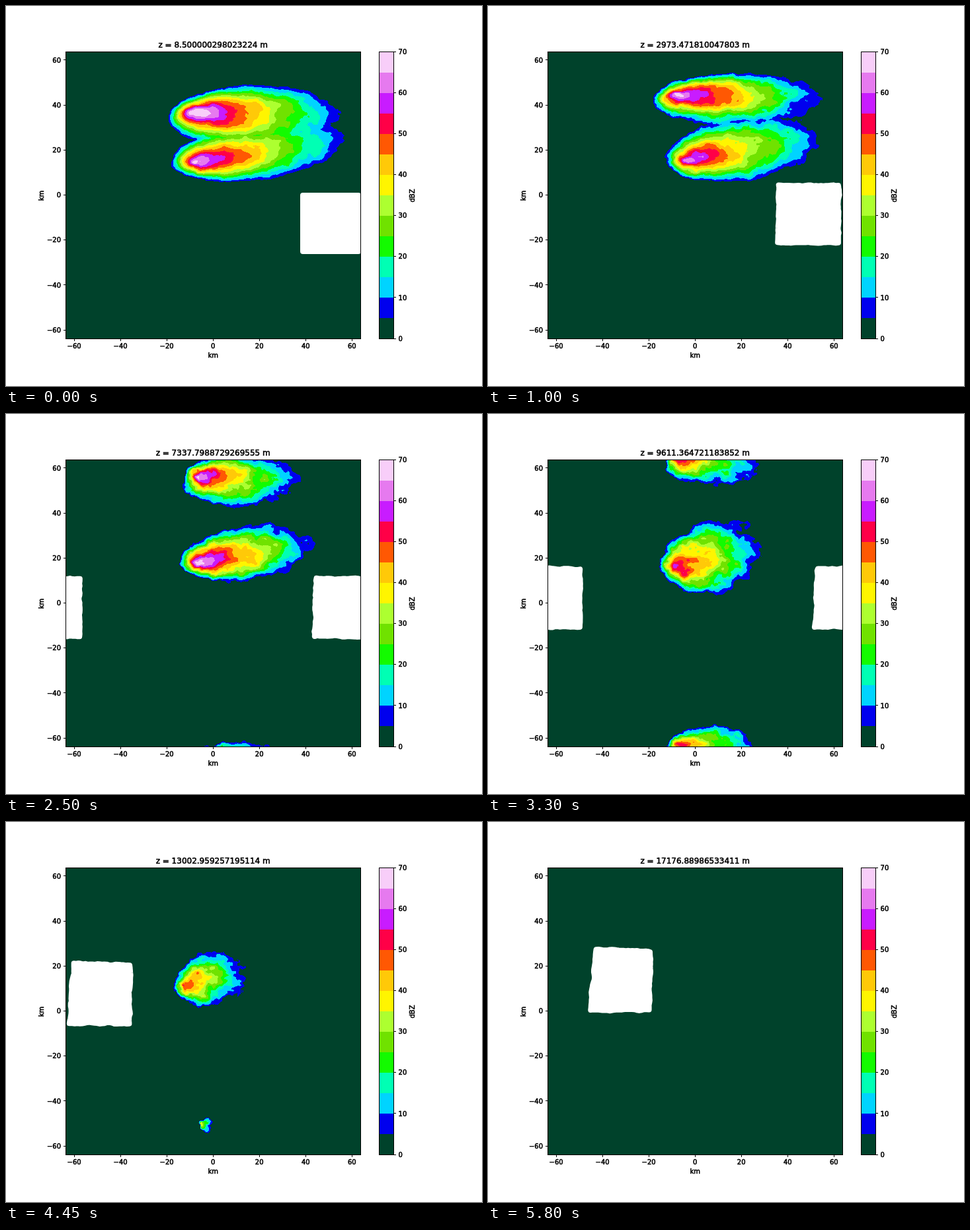
Animation, 720 px wide and 576 px high, one loop 6800 ms. Source, as an HTML page with a canvas:

```html
<!DOCTYPE html>
<html lang="en">
<head>
<meta charset="utf-8">
<title>Reflectivity by height</title>
<style>
html, body { margin: 0; width: 100%; height: 100%; overflow: hidden; background: #fff; }
canvas, svg { position: absolute; left: 0; top: 0; }
canvas { left: 90px; top: 69px; }
text { font: 10px "DejaVu Sans", sans-serif; fill: #000; stroke: #000; stroke-width: .55px; }
#title { font-size: 12px; }
</style>
</head>
<body>
<canvas id="map" width="447" height="435"></canvas>
<svg id="axes" width="720" height="576" viewBox="0 0 720 576"></svg>
<script>
const LOOP = 6800, STEP = 50, LAST = 116;
const W = 447, H = 435, X0 = 90, Y0 = 69, PX = 446.4, PY = 434.88;
const COLORS = ['#00422b', '#0000ee', '#00d4ff', '#00ffb4', '#13fb00', '#70e200', '#adff30',
  '#fff500', '#ffc908', '#ff5803', '#ff0047', '#c81cff', '#e67aef', '#f8cef9'];

// ---- axes, colour bar and labels ----
const svg = document.getElementById('axes');
function add(tag, attrs, text) {
  const el = document.createElementNS('http://www.w3.org/2000/svg', tag);
  for (const a in attrs) el.setAttribute(a, attrs[a]);
  if (text !== undefined) el.textContent = text;
  svg.appendChild(el);
  return el;
}
const label = (x, y, text, anchor, extra) => add('text', { x, y, 'text-anchor': anchor, ...extra }, text);
const upright = (x, y, text) => label(x, y, text, 'middle', { transform: `rotate(-90 ${x} ${y})` });
const tick = d => add('path', { d, stroke: '#000' });
const frame = (x, width) => add('rect', { x, y: 69.5, width, height: 435, fill: 'none', stroke: '#000' });

const edge = i => Math.ceil(504 - i * PY / COLORS.length);
COLORS.forEach((fill, i) => add('rect', {
  x: 564.5, width: 22, y: edge(i + 1), height: edge(i) - edge(i + 1), fill
}));
frame(90.5, 446);
frame(564.5, 22);
for (let v = -60; v <= 60; v += 20) {
  const name = String(v).replace('-', '\u2212');
  const x = 313.2 + v * PX / 127.5, y = 286.56 - v * PY / 127.5;
  tick(`M${Math.floor(x) + .5} 505v3`);
  tick(`M90 ${Math.floor(y) + .5}h-3`);
  label(x, 519, name, 'middle');
  label(83, y + 3.7, name, 'end');
}
for (let v = 0; v <= 70; v += 10) {
  const y = 504 - v * PY / 70;
  tick(`M587 ${Math.floor(y) + .5}h3`);
  label(593.6, y + 3.7, v, 'start');
}
label(313.2, 533, 'km', 'middle');
upright(57, 287.5, 'km');
upright(618, 287.5, 'dBZ');
const title = label(313.2, 63, '', 'middle', { id: 'title' });

// ---- motion ----
// Smooth cubic through column c of rows that start with their step
function at(rows, k, c) {
  let i = 0;
  while (i < rows.length - 2 && k >= rows[i + 1][0]) i++;
  const slope = j => {
    const a = rows[Math.max(j - 1, 0)], b = rows[Math.min(j + 1, rows.length - 1)];
    return (b[c] - a[c]) / (b[0] - a[0]);
  };
  const p = rows[i], q = rows[i + 1], d = q[0] - p[0], u = (k - p[0]) / d;
  return p[c] * (2 * u ** 3 - 3 * u * u + 1) + q[c] * (3 * u * u - 2 * u ** 3) +
    d * (slope(i) * u * (1 - u) ** 2 + slope(i + 1) * u * u * (u - 1));
}

// step, height, left and top of the blank patch
const track = [
  [0, 8.500000298023224, 445, 283],
  [20, 2973.471810047803, 435, 268],
  [32, 4744.759994207638, 442, 260],
  [50, 7337.7988729269555, 463, 245],
  [66, 9611.364721183852, 491, 230],
  [89, 13002.959257195114, 539, 211],
  [LAST, 17176.88986533411, 597, 189]
];

// Each storm is an elliptic cone, its top pushed west and by `lift` off the tilted axis.
// path: step, centre x and y, radii, height in colour levels
const CORE = -.74;
const storms = [
  { tilt: -.01, lift: -.2, path: [
    [0, 374, 168, 128, 48, 13.3],
    [20, 373, 140, 123, 39, 13],
    [32, 354, 125, 93, 36, 13.4],
    [50, 350, 100, 84, 38, 12.4],
    [66, 335, 73, 68, 34, 9.6],
    [89, 303, 24, 7, 10, 6],
    [96, 303, 15, 2, 2, 3]
  ] },
  { tilt: -.12, lift: .12, path: [
    [0, 378, 220, 128, 44, 12.7],
    [20, 383, 217, 115, 47, 12],
    [32, 376, 212, 117, 41, 12.2],
    [50, 364, 211, 99, 41, 13],
    [66, 336, 219, 74, 53, 11],
    [89, 306, 239, 53, 39, 9.8],
    [112, 276, 237, 3, 3, 3]
  ] }
];

// Level at a point: 1 on the rim of the cone, highest at its core
function cone({ tilt, lift, path }, k) {
  const [mx, my, a, b, peak] = [1, 2, 3, 4, 5].map(c => at(path, k, c));
  const m = 1 - CORE * CORE - lift * lift;
  return (x, y) => {
    const ex = x - mx;
    let ey = y - my;
    ey -= Math.round(ey / PY) * PY;
    const dx = ex / a - CORE, dy = (ey - tilt * ex) / b - lift;
    const dot = CORE * dx + lift * dy;
    const g = (dot + Math.sqrt(dot * dot + (dx * dx + dy * dy) * m)) / m;
    return 1 + peak * (1 - g);
  };
}

// ---- seeded, tileable noise ----
function noiseTile(seed) {
  const rnd = () => {
    seed = seed + 0x6D2B79F5 | 0;
    let t = Math.imul(seed ^ seed >>> 15, 1 | seed);
    t = t + Math.imul(t ^ t >>> 7, 61 | t) ^ t;
    return ((t ^ t >>> 14) >>> 0) / 2147483648 - 1;
  };
  const ease = u => u * u * (3 - 2 * u), out = new Float32Array(65536);
  for (const size of [16, 8, 4]) {
    const n = 256 / size, amp = .2 + size / 40, grid = Array.from({ length: n * n }, rnd);
    for (let y = 0; y < 256; y++) for (let x = 0; x < 256; x++) {
      const i = x / size | 0, j = y / size | 0, i2 = (i + 1) % n, j2 = (j + 1) % n;
      const u = ease(x / size - i), v = ease(y / size - j);
      const a = grid[j * n + i] * (1 - u) + grid[j * n + i2] * u;
      const b = grid[j2 * n + i] * (1 - u) + grid[j2 * n + i2] * u;
      out[y << 8 | x] += amp * (a * (1 - v) + b * v);
    }
  }
  return out;
}
const P = noiseTile(7), Q = noiseTile(41);
const pick = (tile, x, y) => tile[(y & 255) << 8 | x & 255];

// ---- drawing ----
const ctx = document.getElementById('map').getContext('2d');
const image = ctx.createImageData(W, H), pixels = new Uint32Array(image.data.buffer);
const palette = COLORS.map(c => {
  const n = parseInt(c.slice(1), 16);
  return (255 << 24 | (n & 255) << 16 | (n & 0xff00) | n >> 16) >>> 0;
});

function drawStorms(k) {
  const cones = storms.filter(s => k < s.path[s.path.length - 1][0]).map(s => cone(s, k));
  const warp = 1.5 + k / 40, rough = 1 + k / 60;
  for (let y = 0, o = 0; y < H; y++) for (let x = 0; x < W; x++, o++) {
    const p = pick(P, x, y + k), q = pick(Q, x + k, y);
    const px = x + X0 + warp * (p + q), py = y + Y0 + warp * (p - q);
    let v = 0;
    for (const level of cones) v = Math.max(v, level(px, py));
    if (v > 0) v += rough * (.6 * pick(P, (x >> 1) + k, y + 97) + .5 * pick(Q, x, y + 50));
    pixels[o] = palette[Math.max(0, Math.min(13, Math.floor(v)))];
  }
  ctx.putImageData(image, 0, 0);
}

// Blank patch: leans over and grows more ragged with height
function drawPatch(k) {
  const age = k / LAST, r = 4, n = 24, wobble = 1.8 * Math.min(1, k / 20);
  const left = at(track, k, 2) + r, top = at(track, k, 3) + r;
  const w = Math.min(99, 92 + .4 * k) - 2 * r, h = 93 + 7 * age - 2 * r;
  const lean = 9 * age ** 1.5, drop = 4 * age * age;
  const corners = [[left + lean, top], [left + w, top + drop], [left + w - drop / 2, top + h], [left, top + h]];
  ctx.fillStyle = ctx.strokeStyle = '#fff';
  ctx.lineWidth = 2 * r;
  ctx.lineJoin = 'round';
  for (const shift of [0, PX]) {
    ctx.beginPath();
    corners.forEach(([ax, ay], e) => {
      const [bx, by] = corners[(e + 1) % 4];
      for (let i = 0; i < n; i++) {
        const u = i / n, d = wobble * pick(Q, i * 4, e * 60 + (k >> 1));
        ctx.lineTo(ax + (bx - ax) * u + d * (e % 2) - X0 - shift, ay + (by - ay) * u + d * (1 - e % 2) - Y0);
      }
    });
    ctx.closePath();
    ctx.fill();
    ctx.stroke();
  }
}

const start = performance.now();
let shown = -1;
function draw() {
  const t = (performance.now() - start) % LOOP;
  const k = Math.min(LAST, Math.floor(t / STEP));
  if (k !== shown) {
    shown = k;
    title.textContent = `z = ${at(track, k, 1)} m`;
    drawStorms(k);
    drawPatch(k);
  }
  requestAnimationFrame(draw);
}
draw();
</script>
</body>
</html>
```
